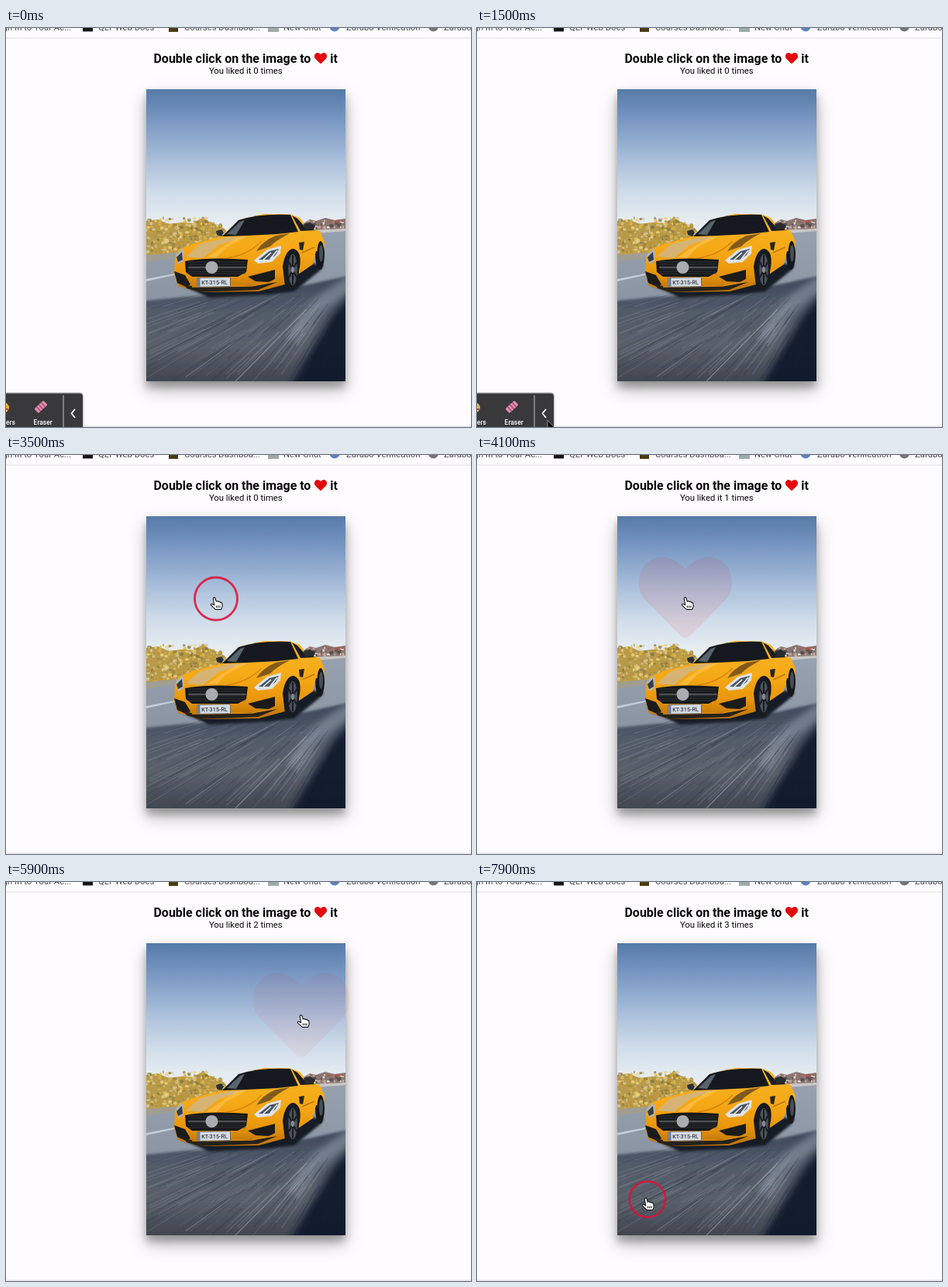
Animation of 600x515 px, one loop 8 s. Source, as an HTML page:

```html
<!DOCTYPE html>
<html lang="en">
<head>
<meta charset="utf-8">
<title>Double click to like</title>
<style>
  html, body { margin: 0; width: 100%; height: 100%; overflow: hidden; background: #fefcfe; }
  #stage { position: relative; width: 600px; height: 515px; overflow: hidden; font-family: Roboto, Arial, sans-serif; }
  svg { position: absolute; display: block; }
  #card {
    position: absolute; left: 181px; top: 79px; width: 256.5px; height: 376.5px;
    box-shadow: 0 11px 22px rgba(0,0,0,.27), 0 8px 9px rgba(0,0,0,.24);
  }
</style>
</head>
<body>
<div id="stage">
  <div id="card">
    <svg width="256.5" height="376.5" viewBox="181 79 256.5 376.5">
      <defs>
        <linearGradient id="sky" x1="0" y1="0" x2="0" y2="1">
          <stop offset="0" stop-color="#567aa7"/>
          <stop offset=".2" stop-color="#7796c1"/>
          <stop offset=".45" stop-color="#a4bbd9"/>
          <stop offset=".7" stop-color="#cfdcea"/>
          <stop offset=".88" stop-color="#e4ebf1"/>
          <stop offset="1" stop-color="#eaeef0"/>
        </linearGradient>
        <linearGradient id="road" x1="0" y1="0" x2="0" y2="1">
          <stop offset="0" stop-color="#98a1af"/>
          <stop offset="1" stop-color="#7c8797"/>
        </linearGradient>
        <linearGradient id="shade" x1="0" y1="0" x2="0" y2="1">
          <stop offset="0" stop-color="#3c4759"/>
          <stop offset=".3" stop-color="#515a69"/>
          <stop offset=".6" stop-color="#5a606b"/>
          <stop offset="1" stop-color="#383d47"/>
        </linearGradient>
        <linearGradient id="paint" x1="0" y1="0" x2="0" y2="1">
          <stop offset="0" stop-color="#f5b526"/>
          <stop offset=".45" stop-color="#f6a916"/>
          <stop offset=".75" stop-color="#e9960c"/>
          <stop offset="1" stop-color="#b9700a"/>
        </linearGradient>
        <filter id="soft" x="-30%" y="-30%" width="160%" height="160%"><feGaussianBlur stdDeviation="4"/></filter>
        <filter id="fine" x="-30%" y="-30%" width="160%" height="160%"><feGaussianBlur stdDeviation="1.6"/></filter>
      </defs>

      <rect x="181" y="79" width="257" height="190" fill="url(#sky)"/>
      <path d="M384 262V252L392 247 400 249 412 245 424 248 438 246V264Z" fill="#8b7670"/>
      <path d="M181 300V249L196 247 210 253 226 251 240 252 252 246 266 251 282 259 290 272V300Z" fill="#b89a4c"/>
      <g id="leaves"></g>
      <path d="M181 294L285 288 390 261 438 260V456H181Z" fill="url(#road)"/>
      <path d="M181 293L240 288V293L181 302Z" fill="#a09d92"/>
      <path d="M390 261L438 259V262L400 265Z" fill="#c9c8c6"/>
      <path d="M181 324L217 317V319L181 327Z" fill="#c4cdd9"/>
      <path d="M170 353L230 347 330 341 390 331 450 318V470H170Z" fill="url(#shade)" filter="url(#fine)"/>
      <path d="M445 316L395 352 360 400 376 405 405 368 445 338Z" fill="#8f99a8" opacity=".6" filter="url(#soft)"/>
      <g id="streaks"></g>
      <path d="M450 340L423 368 396 410 362 470H450Z" fill="#0e1929" opacity=".9" filter="url(#soft)"/>
      <path d="M296 456L388 363" stroke="#a2a9b3" stroke-width="1.200" opacity=".6"/>

      <!-- car -->
      <path d="M222 330L262 348 340 344 372 340 405 313 410 306 370 300Z" fill="#151c28" filter="url(#fine)"/>
      <ellipse cx="405" cy="292" rx="6" ry="20" fill="#15181d"/>
      <path d="M218 297L223 286 243 278 279 269 303 247 332 240 367 240.500 379 245 389 257 405 262 411 276 410 290 400 288 396 305 377 318 360 331 326 340 250 341 222 333 217 318Z" fill="url(#paint)"/>
      <path d="M279 269L300 248Q327 239 367 241L377 263 350 266 310 268Z" fill="#15191f"/>
      <path d="M285 266L302 250 308 248 297 267Z" fill="#58636b"/>
      <path d="M369 242L376 246 387 258 400 261 380 262Z" fill="#1b1d21"/>
      <path d="M384 253L392 251 399 255 397 260 386 260Z" fill="#2a2b30"/>
      <path d="M271 262L278 260 281 264 278 269 272 267Z" fill="#2b2f34"/>
      <path d="M232 295L250 279 287 270 309 269 275 280 254 297Z" fill="#cfb78c" opacity=".8"/>
      <path d="M259 296L297 271 311 269 283 284 271 297Z" fill="#ffc450" opacity=".65"/>
      <path d="M323 288Q331 275 348 268L366 265Q347 275 341 282Z" fill="#654619" opacity=".8"/>
      <path d="M284 297Q311 294 330 275" stroke="#d68208" stroke-width="1.200" fill="none"/>
      <path d="M219 293L228 284 230 291 229 301 222 305Z" fill="#aeb5bd"/>
      <path d="M220 296L227 289 228 299 222 302Z" fill="#353c45"/>
      <path d="M320 300L337 286 355 281 354 291 343 302 325 304Z" fill="#dde3e9"/>
      <path d="M326 299L340 288 352 285 348 293 339 299Z" fill="#4b5663"/>
      <path d="M332 299L342 290M341 298L350 287" stroke="#f3f5f7" stroke-width="1.500"/>
      <path d="M231 301Q265 295 312 299L310 315 299 321 240 321 232 315Z" fill="#151719"/>
      <g id="grille" stroke="#393d41" stroke-width=".8"></g>
      <path d="M235 309H310" stroke="#7d8185" stroke-width="1.200"/>
      <circle cx="265.500" cy="309" r="8" fill="#a9adb2"/>
      <path d="M217 314L231 319 238 331 232 334 221 329Z" fill="#1b1b1c"/>
      <path d="M312 321L347 312 347 324 339 328 322 327Z" fill="#1b1b1c"/>
      <path d="M230 331L249 335 290 334 325 332 350 328 325 338 250 341 233 336Z" fill="#26221b"/>
      <path d="M240 334L317 333 347 327" fill="none" stroke="#d98c12" stroke-width="1.500"/>
      <path d="M357 308Q360 286 371 285 382 288 379 309L374 329 360 333Z" fill="#15181c"/>
      <ellipse cx="369" cy="312" rx="9" ry="26.500" fill="#181b20"/>
      <ellipse cx="370" cy="312" rx="5.800" ry="20" fill="#4c535c"/>
      <path d="M370 293V331M365 302L375 322M375 302L365 322" stroke="#181c21" stroke-width="2"/>
      <ellipse cx="370" cy="312" rx="2" ry="4" fill="#888e95"/>
      <ellipse cx="406" cy="291" rx="4.500" ry="16" fill="#14171b"/>
      <ellipse cx="406.500" cy="291" rx="2.500" ry="11" fill="#484f57"/>
      <path d="M378 277L385 276 383 287 379 286Z" fill="#252522"/>
      <path d="M382 290L398 283" stroke="#bc790b" stroke-width="1.500"/>
      <g transform="rotate(-1 268 328)">
        <rect x="247" y="322" width="42.500" height="12" rx="1" fill="#d7dce4" stroke="#4b5059" stroke-width=".8"/>
        <rect x="247.500" y="322.500" width="3" height="11" fill="#637ba9"/>
        <text x="269" y="331" text-anchor="middle" font-size="7.300" font-weight="500" fill="#323844">KT-315-RL</text>
      </g>
    </svg>
  </div>

  <svg width="600" height="515" viewBox="0 0 600 515">
    <defs>
      <path id="heart" d="M0 7C-.5 7 -.8 6.700 -1.200 6.300L-7 .4C-8.600 -1.300 -8.400 -4.600 -6.600 -6.100 -4.700 -7.700 -2 -7.200 0 -5 2 -7.200 4.700 -7.700 6.600 -6.100 8.400 -4.600 8.600 -1.300 7 .4L1.200 6.300C.8 6.700 .5 7 0 7Z"/>
    </defs>

    <g font-size="11.300" fill="#4c4b50">
      <text x="84" y="2.700" text-anchor="end">Sign In to Your Ac...</text>
      <rect x="99" y="-8" width="13" height="12.500" fill="#151515"/>
      <text x="119" y="2.700">QLT Web Docs</text>
      <rect x="210" y="-7" width="12" height="12" fill="#4b3a12"/>
      <text x="230" y="2.700">Courses Dashboa...</text>
      <rect x="338" y="-9" width="14" height="14" fill="#9eaaa8"/>
      <text x="358" y="2.700">New Chat</text>
      <circle cx="424" cy="-2" r="6.500" fill="#5d82c4"/>
      <text x="439" y="2.700">Zarubo Verification</text>
      <circle cx="551.500" cy="-2" r="6.500" fill="#737378"/>
      <text x="565" y="2.700">Zarubo Dash</text>
    </g>
    <rect y="12.500" width="600" height="1" fill="#e0dee2"/>

    <g fill="#080808">
      <g font-size="15.950" font-weight="700">
        <text x="190.500" y="44.700">Double click on the image to</text>
        <text x="418.300" y="44.700">it</text>
      </g>
      <text id="count" x="309.300" y="59" font-size="11.300" text-anchor="middle"></text>
    </g>
    <use href="#heart" x="406" y="39" fill="#e4060b"/>
    <rect y="513.500" width="600" height="2" fill="#e6e4e7"/>

    <g id="toolbar">
      <rect x="-10" y="470" width="110.500" height="60" rx="5" fill="#000" opacity=".18"/>
      <rect x="-10" y="471.500" width="109" height="60" rx="4" fill="#39383b"/>
      <circle cx="-2.500" cy="490" r="6.500" fill="#f4b32f"/>
      <path d="M-2 492H3" stroke="#c83d32" stroke-width="2"/>
      <g transform="translate(45 489) rotate(-43)">
        <rect x="-8" y="-4" width="16" height="8" rx="1.500" fill="#e58bad"/>
        <path d="M-4 -4V4M0 -4V4M4 -4V4" stroke="#9c4e74" stroke-width="1.500"/>
      </g>
      <g font-size="8.500" font-weight="500" fill="#fff">
        <text x="12" y="512" text-anchor="end">Stickers</text>
        <text x="47.700" y="512" text-anchor="middle">Eraser</text>
      </g>
      <path d="M74 474V515" stroke="#c4c3c6"/>
      <path d="M89 492L84.500 497.500 89 503" fill="none" stroke="#fff" stroke-width="1.800"/>
    </g>

    <use id="burst" href="#heart" fill="#e4060b"/>
    <circle id="ring" fill="none" stroke="#dc1239" stroke-width="2.800" opacity=".86"/>
    <path id="arrow" d="M0 0V14.500L3.400 11.300 5.600 16.300 8 15.200 5.900 10.400H10.500Z" fill="#0a0a0a" stroke="#fff" stroke-width=".5"/>
    <path id="hand" d="M-1.700 1.300C-1.900 -.3 .4 -.7 1 .9L2.200 5.200C3.200 4.100 4.500 4.500 4.900 5.500 6 4.800 7 5.200 7.400 6.200 8.700 5.800 9.700 6.700 9.900 7.900L10.100 11.600 8.700 15.400H1.500L-4.100 10.400C-5.700 8.800 -3.800 7.400 -2.200 8.500L-.3 9.800ZM2.500 10.500V13M4.700 10.500V13M6.900 10.500V13" fill="#fff" stroke="#16181c" stroke-width="1.100" stroke-linejoin="round"/>
  </svg>
</div>

<script>
const LOOP = 8000, STEP = 100;
const $ = id => document.getElementById(id);

// pointer moves: [start, end, x, y]; it rests in between
const START = [90, 518];
const moves = [
  [1200, 1500, 91, 506.5],
  [2450, 3200, 269, 184],
  [4300, 4850, 381, 172],
  [5950, 6400, 218, 408]
];
const clicks = [3200, 3550, 5080, 5330, 6440, 6690, 7700];
const likes = [3550, 5330, 6690];
const COLLAPSE = [1650, 2000];
const RING_LIFE = 360, HEART_LIFE = 600, HEART_SCALE = 8.1;

function random(seed) {
  return () => (seed = (seed * 16807) % 2147483647) / 2147483647;
}

function add(parent, tag, attrs) {
  const el = document.createElementNS("http://www.w3.org/2000/svg", tag);
  for (const key in attrs) el.setAttribute(key, attrs[key]);
  $(parent).append(el);
}

function buildTexture() {
  const rnd = random(71);
  const pick = list => list[Math.floor(rnd() * list.length)];

  const gold = ["#dcb748", "#978542", "#c9a540", "#efd27a", "#7d743e", "#d6c89a", "#c0922f"];
  for (let i = 0; i < 320; i++) {
    const x = 181 + rnd() * 105;
    const top = 245 + Math.max(0, x - 258) * .5;
    add("leaves", "ellipse", {
      cx: x, cy: top + rnd() * (292 - top), rx: .8 + rnd() * 2, ry: .7 + rnd() * 2,
      fill: pick(gold), opacity: .8
    });
  }
  const town = ["#c6a59b", "#575052", "#a9584b", "#e6e5e2"];
  for (let i = 0; i < 34; i++) {
    add("leaves", "rect", {
      x: 388 + rnd() * 50, y: 248 + rnd() * 10, width: 1 + rnd() * 4,
      height: 1 + rnd() * 3, fill: pick(town)
    });
  }
  // road grain runs towards one vanishing point
  for (let i = 0; i < 150; i++) {
    const x = 170 + rnd() * 240, y = 358 + rnd() * 105, reach = .12 + rnd() * .2;
    add("streaks", "path", {
      d: `M${x} ${y}l${(470 - x) * reach} ${(280 - y) * reach}`,
      stroke: pick(["#a2a8b1", "#232a36"]), "stroke-width": .5 + rnd(), opacity: .25
    });
  }
  for (let y = 302; y < 320; y += 3) add("grille", "path", { d: `M235 ${y}H309` });
}

const clamp = v => Math.min(1, Math.max(0, v));
const smooth = (t, from, to) => {
  const p = clamp((t - from) / (to - from));
  return p * p * (3 - 2 * p);
};

function pointerAt(t) {
  let [x, y] = START;
  for (const [from, to, x1, y1] of moves) {
    const p = smooth(t, from, to);
    x += (x1 - x) * p;
    y += (y1 - y) * p;
  }
  return [x, y];
}

const lastOf = (times, t) => times.filter(time => time <= t).pop();
const show = (id, on) => $(id).style.display = on ? "" : "none";
const place = (id, [x, y], scale = 1) =>
  $(id).setAttribute("transform", `translate(${x} ${y}) scale(${scale})`);

function draw(t) {
  $("count").textContent = `You liked it ${likes.filter(time => time <= t).length} times`;
  place("toolbar", [-102 * smooth(t, ...COLLAPSE), 0]);

  const pos = pointerAt(t);
  const onCard = pos[0] >= 181 && pos[0] <= 437 && pos[1] >= 79 && pos[1] <= 455;
  show("arrow", !onCard);
  show("hand", onCard);
  place("arrow", pos);
  place("hand", pos);

  const age = t - lastOf(clicks, t);
  show("ring", age < RING_LIFE);
  if (age < RING_LIFE) {
    place("ring", [pos[0] + 2, pos[1] + 1.5]);
    $("ring").setAttribute("r", 14.5 + 13 * clamp(age / 300));
  }

  const liked = lastOf(likes, t);
  const p = (t - liked) / HEART_LIFE;
  show("burst", p < 1);
  if (p < 1) {
    place("burst", pointerAt(liked), HEART_SCALE * p);
    $("burst").setAttribute("opacity", 1 - p);
  }
}

function tick() {
  draw(Math.floor(performance.now() % LOOP / STEP) * STEP);
  requestAnimationFrame(tick);
}

buildTexture();
tick();
</script>
</body>
</html>
```
